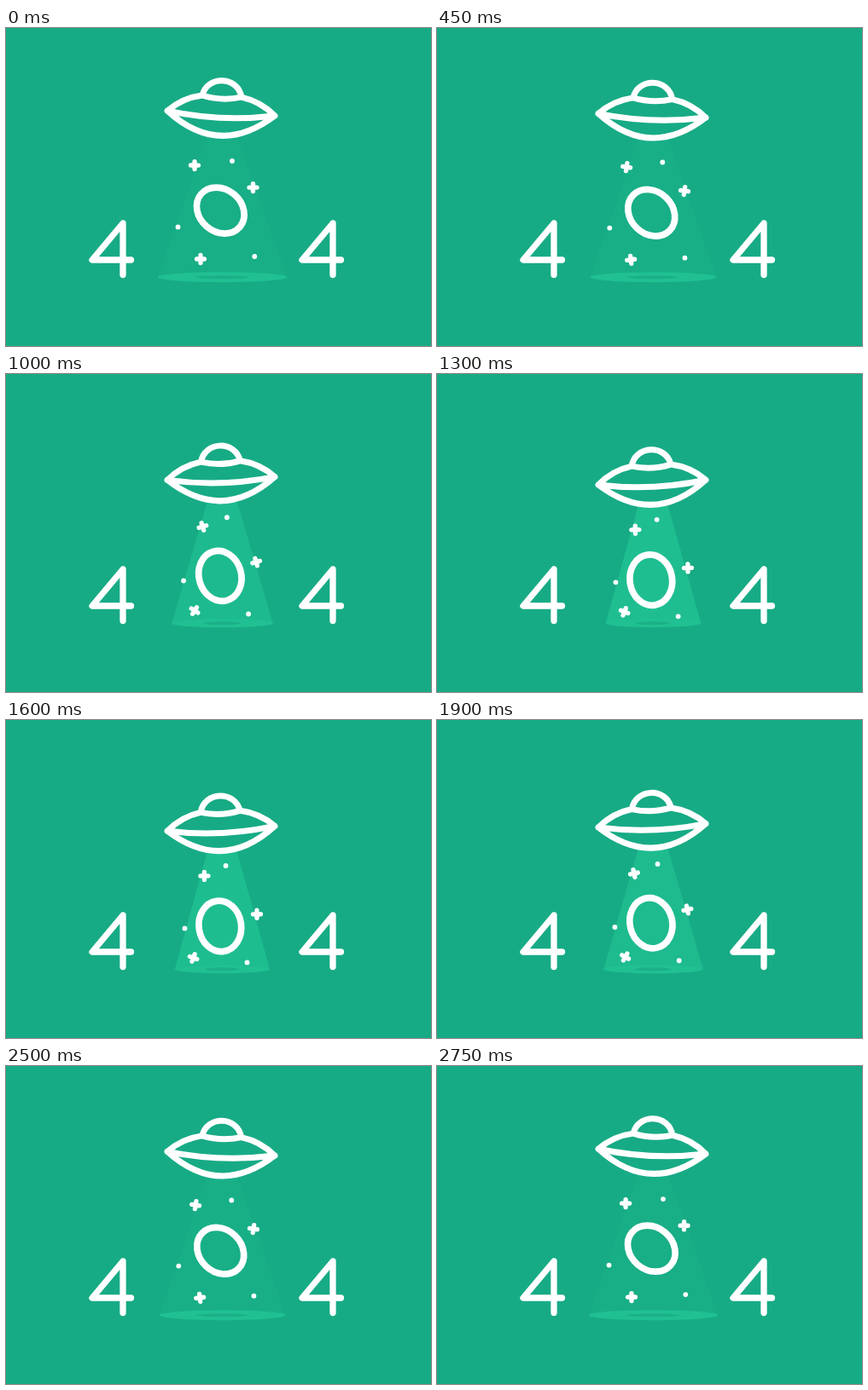
These frames come from a looping animation (498x373 px, 2800 ms). An HTML page with a canvas:

```html
<!DOCTYPE html>
<html lang="en">
<head>
<meta charset="utf-8">
<title>404</title>
<style>
  html, body { margin: 0; height: 100%; overflow: hidden; background: #17ab85; }
  canvas { display: block; }
</style>
</head>
<body>
<canvas id="stage" width="498" height="373"></canvas>
<script>
const ctx = document.getElementById('stage').getContext('2d');
const LOOP = 2800, STEP = 50, LAG = 75;

const saucer = new Path2D(
  'M-63 0Q-46-16-23-20Q0-14 23-20Q46-16 63 0Q0 52.5-63 0Z' +
  'M-63 0Q0 10.5 63 0M-23-20C-18-44.5 18-44.5 23-20');
const four = new Path2D('M0 289.5V229L-36 272H9.5');
const plus = new Path2D('M-4.5 0H4.5M0-4.5V4.5');
const zero = new Path2D();
zero.ellipse(0, 0, 24.8, 29.8, 0, 0, 7);

// Low pose x, y, high pose x, y, turn in degrees
const stars = [[221, 161, 232.5, 183, 90], [289.5, 187, 294, 228, 90], [228, 271, 219.5, 279, -70]];
const dots = [[265, 156, 257.5, 171], [201.5, 233.5, 209.5, 244.5], [291.3, 268, 282.5, 284.5]];

const mix = (a, b, k) => a + (b - a) * k;
const ease = p => p < .5 ? (2 * p) ** 2.6 / 2 : 1 - (2 - 2 * p) ** 2.6 / 2;

function stroke(path, x, y, degrees, width) {
  ctx.save();
  ctx.translate(x, y);
  ctx.rotate(degrees * Math.PI / 180);
  ctx.lineWidth = width;
  ctx.stroke(path);
  ctx.restore();
}

function oval(x, y, rx, ry, color) {
  ctx.fillStyle = color;
  ctx.beginPath();
  ctx.ellipse(x, y, rx, ry, 0, 0, 7);
  ctx.fill();
}

function drawBeam(k, saucerY) {
  const rx = mix(76, 55.5, k), ground = 292.3, top = saucerY + 25;
  ctx.globalAlpha = mix(.1, .9, k);
  ctx.fillStyle = '#20c092';
  ctx.beginPath();
  ctx.moveTo(236.5, top);
  ctx.lineTo(270, top);
  ctx.lineTo(253.5 + rx, ground);
  ctx.lineTo(253.5 - rx, ground);
  ctx.fill();
  ctx.globalAlpha = 1;
  oval(253.5, ground, rx, mix(6, 4.8, k), '#20c092');
  oval(253, ground, mix(31, 20, k), 2, '#1bb088');
}

function draw(time) {
  const t = (Math.floor(time / STEP) * STEP - LAG + LOOP) % LOOP;
  const k = ease(1 - Math.abs(1 - t / (LOOP / 2)));
  const saucerY = mix(100, 127.5, k);

  ctx.fillStyle = '#17ab85';
  ctx.fillRect(0, 0, 498, 373);
  drawBeam(k, saucerY);

  ctx.strokeStyle = '#fff';
  ctx.lineCap = ctx.lineJoin = 'round';
  stroke(four, 137, 0, 0, 7.3);
  stroke(four, 383, 0, 0, 7.3);
  stroke(saucer, 252, saucerY, mix(2.7, -2.7, k), 7);
  stroke(zero, 251.3 - k / 2, mix(214, 242, k), mix(-50, -8, k), 7.7);
  for (const [x0, y0, x1, y1, turn] of stars)
    stroke(plus, mix(x0, x1, k), mix(y0, y1, k), turn * k, 5.3);
  for (const [x0, y0, x1, y1] of dots)
    oval(mix(x0, x1, k), mix(y0, y1, k), 2.9, 2.9, '#fff');
}

function tick() {
  draw(performance.now() % LOOP);
  requestAnimationFrame(tick);
}
tick();
</script>
</body>
</html>
```
